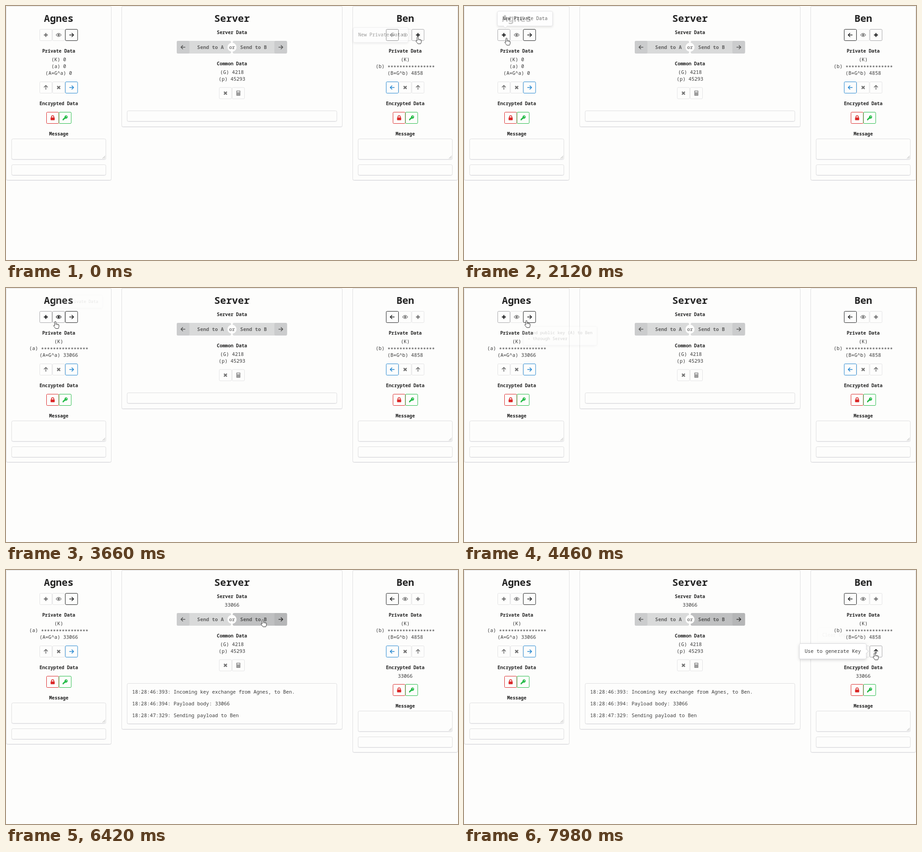
Recreate the animation shown at these times as an HTML page. Size 998 px wide and 561 px high, loop 8000 ms.

```html
<!DOCTYPE html>
<html>
<head>
<meta charset="utf-8">
<style>
html, body { margin: 0; width: 100%; height: 100%; overflow: hidden; background: #fdfdfc; }
svg { display: block; }
text { font: 10.9px "Noto Sans Mono", "DejaVu Sans Mono", monospace; fill: #3a3a3a; white-space: pre; }
.h { font-size: 21.8px; font-weight: 600; fill: #222; }
.b { font-size: 10.14px; font-weight: 600; fill: #222; }
.s { font-weight: 600; fill: #555; }
</style>
</head>
<body>
<svg id="stage" width="998" height="561" viewBox="0 0 998 561"></svg>
<script>
const LOOP = 8000;
const A = 'Agnes', B = 'Ben', STARS = '*'.repeat(16);
const GREY = '#717171', DARK = '#1f2021', BLUE = '#2185d0', RED = '#db2828', GREEN = '#21ba45';
// Clicks: new key, send to server, forward to the other side
const NEW_KEY = 2560, SEND = 4880, FORWARD = 6280;

// Pointer tip: time, x, y
const PATH = [
  [0, 909, 68], [150, 909, 68], [1950, 94, 71], [3520, 94, 71], [3660, 109, 74],
  [3800, 117, 74], [4300, 118, 73], [4460, 138, 72], [4600, 143, 71], [4900, 143, 71],
  [5540, 567, 117], [6420, 567, 110], [6620, 567, 110], [7700, 907, 183], [8000, 907, 183]
];

const clamp = v => Math.max(0, Math.min(1, v));
const line = (d, w) => `<path d="${d}" fill="none" stroke="currentColor" stroke-width="${w}"/>`;
const solid = d => `<path d="${d}" fill="currentColor" fill-rule="evenodd"/>`;
const arrow = turn => `<g transform="rotate(${turn})">${line('M-4.8 0H4.2M.4-4.2L4.6 0L.4 4.2', 1.6)}</g>`;

const ICONS = {
  right: arrow(0), left: arrow(180), up: arrow(-90),
  plus: line('M-4.3 0H4.3M0-4.3V4.3', 2.4),
  times: line('M-3.2-3.2L3.2 3.2M-3.2 3.2L3.2-3.2', 2.5),
  eye: line('M-5.6 0Q0-7.2 5.6 0Q0 7.2-5.6 0Z', 1.2) + '<circle r="2.3" fill="currentColor"/>',
  lock: line('M-2.6 0V-2.2A2.6 2.6 0 0 1 2.6-2.2V0', 1.6) +
    '<rect x="-4.5" y="-.8" width="9" height="6" rx="1" fill="currentColor"/>',
  key: solid('M2-5.5A3.6 3.6 0 1 1 .8 1.5L-.4 2.7H-1.8V4H-3.1V5.4H-5.5V3L-1.2-1.2A3.6 3.6 0 0 1 2-5.5ZM2.8-3.8A1 1 0 1 0 2.9-3.8Z'),
  calc: solid('M-4.2-5.4H4.2V5.4H-4.2ZM-3-4.2V-1.8H3V-4.2ZM-3-.4V1H-1.6V-.4ZM-.7-.4V1H.7V-.4ZM1.6-.4V1H3V-.4ZM-3 2.4V4H-1.6V2.4ZM-.7 2.4V4H.7V2.4ZM1.6 2.4V4H3V2.4Z')
};

let mx, my, hot;

function pointerAt(t) {
  const i = PATH.findIndex(p => p[0] > t);
  const [t0, x0, y0] = PATH[i - 1], [t1, x1, y1] = PATH[i];
  const p = (t - t0) / (t1 - t0), e = p * p * (3 - 2 * p);
  return [x0 + (x1 - x0) * e, y0 + (y1 - y0) * e];
}

function over(x, y, w, h) {
  const inside = mx >= x && mx < x + w && my >= y && my < y + h;
  hot = hot || inside;
  return inside;
}

const text = (x, y, s, cls = '', anchor = 'middle') =>
  `<text x="${x}" y="${y}" class="${cls}" text-anchor="${anchor}">${s}</text>`;

const icon = (name, x, y, color) =>
  `<g transform="translate(${x} ${y})" color="${color}">${ICONS[name]}</g>`;

const box = (x, y, w, h) =>
  `<rect x="${x + .5}" y="${y + 1.5}" width="${w - 1}" height="${h - 1}" rx="3" fill="none" stroke="#e6e6ea"/>
   <rect x="${x + .5}" y="${y + .5}" width="${w - 1}" height="${h - 1}" rx="3" fill="#fdfdfc" stroke="#dededf"/>`;

function button(x, y, name, color = GREY, focus = false) {
  const on = over(x, y, 28, 27) || focus, plain = color === GREY;
  const edge = plain ? (on ? '#a5a5a8' : '#e3e3e4') : color;
  return `<rect x="${x + .5}" y="${y + .5}" width="27" height="25" rx="2" fill="none" stroke="${edge}"/>` +
    icon(name, x + 14, y + 13, plain && on ? DARK : color);
}

// One party's card; `rows` are the three private values
function party(x, name, row1, row2, rows, received) {
  const c = x + 116.5, d = received ? 18 : 0;
  const trio = (y, list) => list.map((b, i) => button(x + 74 + i * 28.3, y, ...b)).join('');
  return box(x, 0, 233, 385 + d) + text(c, 34.5, name, 'h') + trio(51, row1) +
    text(c, 103, 'Private Data', 'b') + rows.map((r, i) => text(c, 122 + i * 15, r)).join('') +
    trio(167, row2) + text(c, 219, 'Encrypted Data', 'b') +
    (received ? text(c, 237.5, received) : '') +
    button(x + 89, 234 + d, 'lock', RED) + button(x + 116.5, 234 + d, 'key', GREEN) +
    text(c, 286 + d, 'Message', 'b') + box(x + 12, 293 + d, 209, 46) +
    `<path d="M${x + 213} ${337 + d}l6-6m-3 6l3-3" stroke="#999" stroke-width=".8"/>` +
    box(x + 12, 350 + d, 209, 24);
}

function sendButton(x, y, label, dir, active) {
  const on = over(x, y, 120, 28), left = dir === 'left';
  const [fill, side] = active ? ['#bfc0c1', '#b5b6b7'] : on ? ['#cfd0d1', '#c3c4c5'] : ['#d9dada', '#cbcccd'];
  const ix = left ? x : x + 92, color = active || on ? '#333' : '#555';
  return `<rect x="${x}" y="${y}" width="120" height="28" rx="3" fill="${fill}"/>
    <rect x="${ix}" y="${y}" width="28" height="28" rx="3" fill="${side}"/>` +
    icon(dir, ix + 14, y + 14, color) +
    `<g opacity="${active ? 1.0 : .9}">${text(left ? 451.5 : 546.5, y + 18, label, 's')}</g>`;
}

function server(t) {
  const d = t >= SEND ? 18 : 0;
  const log = [
    [SEND, `18:28:46:393: Incoming key exchange from ${A}, to ${B}.`],
    [SEND, '18:28:46:394: Payload body: 33066'],
    [FORWARD, `18:28:47:329: Sending payload to ${B}`]
  ].filter(l => t >= l[0]);
  const h = log.length ? 12 + 26 * log.length : 24;
  return box(255, 0, 488, 243 + d + h + (d ? 1 : 0)) + text(499, 34.5, 'Server', 'h') + text(499, 62, 'Server Data', 'b') +
    (d ? text(499, 80.5, '33066') : '') +
    sendButton(377, 77 + d, 'Send to A', 'left') +
    sendButton(500.5, 77 + d, 'Send to B', 'right', t >= FORWARD) +
    `<circle cx="499" cy="${91 + d}" r="10" fill="#fdfdfc"/><g opacity=".7">${text(499, 94.5 + d, 'or', 's')}</g>` +
    text(499, 131 + d, 'Common Data', 'b') + text(499, 150 + d, '(G) 4218') + text(499, 165 + d, '(p) 45293') +
    button(470.5, 179.5 + d, 'times') + button(499, 179.5 + d, 'calc') +
    box(267, 231 + d + (d ? 1 : 0), 464, h) +
    log.map((l, i) => text(278.5, 273 + i * 26, l[1], '', 'start')).join('');
}

// Popup shown from a to b; (x, y) is its anchor, ax and ay where that lies on the box
function popup(t, a, b, x, y, ax, ay, lines) {
  const fadeIn = clamp((t - a) / 200), fadeOut = clamp((b + 200 - t) / 200);
  const o = Math.min(fadeIn, fadeOut);
  if (!o) return '';
  const scale = fadeIn < 1 ? .8 + .2 * fadeIn : .9 + .1 * fadeOut;
  const w = Math.max(...lines.map(l => l.length)) * 6.54 + 23, h = 19 + 15 * lines.length;
  const l = -ax * w, top = -ay * h;
  const px = ay === .5 ? 0 : ax ? -14 : 18;
  return `<g transform="translate(${x} ${y}) scale(${scale})" opacity="${o}">
    <g style="filter:drop-shadow(0 2px 3px rgba(34,36,38,.18))">
    <rect x="${l}" y="${top}" width="${w}" height="${h}" rx="3" fill="#fff" stroke="#d8d8dc"/></g>
    <rect x="-3.5" y="-3.5" width="7" height="7" transform="translate(${px} 0) rotate(45)" fill="#fff" stroke="#d8d8dc"/>
    <rect x="${l + .5}" y="${top + .5}" width="${w - 1}" height="${h - 1}" rx="3" fill="#fff"/>` +
    lines.map((s, i) => text(l + 11.5, top + 20.5 + i * 15, s, '', 'start')).join('') + '</g>';
}

function pointer() {
  const d = hot
    ? 'M-1.5 9V1.2a1.4 1.4 0 0 1 2.8 0V5.6Q2.7 4.6 3.8 6Q5.2 5.2 6 6.6Q8 6.2 8 8.4V11Q7.6 13 6.6 15.5H.4Q-1.2 13-4 9.6Q-3.8 7.4-1.5 9Z'
    : 'M0 0V13L3 10.2L5 15L7 14.1L5 9.5H9Z';
  return `<path transform="translate(${mx} ${my})" d="${d}" fill="#fff" stroke="#333" stroke-width="1"/>` +
    (hot ? `<path transform="translate(${mx} ${my})" d="M1.3 5.5V8M3.8 6V8.2M6 6.6V8.5" stroke="#555" stroke-width=".8"/>` : '');
}

function scene(t) {
  [mx, my] = pointerAt(t);
  hot = false;
  const made = t >= NEW_KEY;
  const stars = v => `(${v}) <tspan dy="2">${STARS}</tspan>`;
  return party(0, A,
      [['plus', GREY, made && t < SEND], ['eye'], ['right', DARK]],
      [['up'], ['times'], ['right', BLUE]],
      made ? ['(K)', stars('a'), '(A=G^a) 33066'] : ['(K) 0', '(a) 0', '(A=G^a) 0']) +
    server(t) +
    party(765, B,
      [['left', DARK], ['eye'], ['plus', GREY, !made]],
      [['left', BLUE], ['times'], ['up']],
      ['(K)', stars('b'), '(B=G^b) 4858'], t >= FORWARD ? '33066' : '') +
    popup(t, -900, -100, 888, 64, 1, .5, ['New Private Data']) +
    popup(t, 1970, 3350, 74, 44, 0, 1, ['New Private Data']) +
    popup(t, 3640, 4150, 103, 44, 0, 1, ['Show Private Data']) +
    popup(t, 4420, 4880, 131, 85, 0, 0, [`Send public key (A) to ${B}`, '- through Server']) +
    popup(t, 7420, 7790, 896, 159, 1, 1, ['Clear Input Data']) +
    popup(t, 7700, 9000, 888, 179.5, 1, .5, ['Use to generate Key']) +
    pointer();
}

const stage = document.getElementById('stage');
const start = performance.now();
function frame() {
  stage.innerHTML = scene((performance.now() - start) % LOOP);
  requestAnimationFrame(frame);
}
frame();
</script>
</body>
</html>
```
